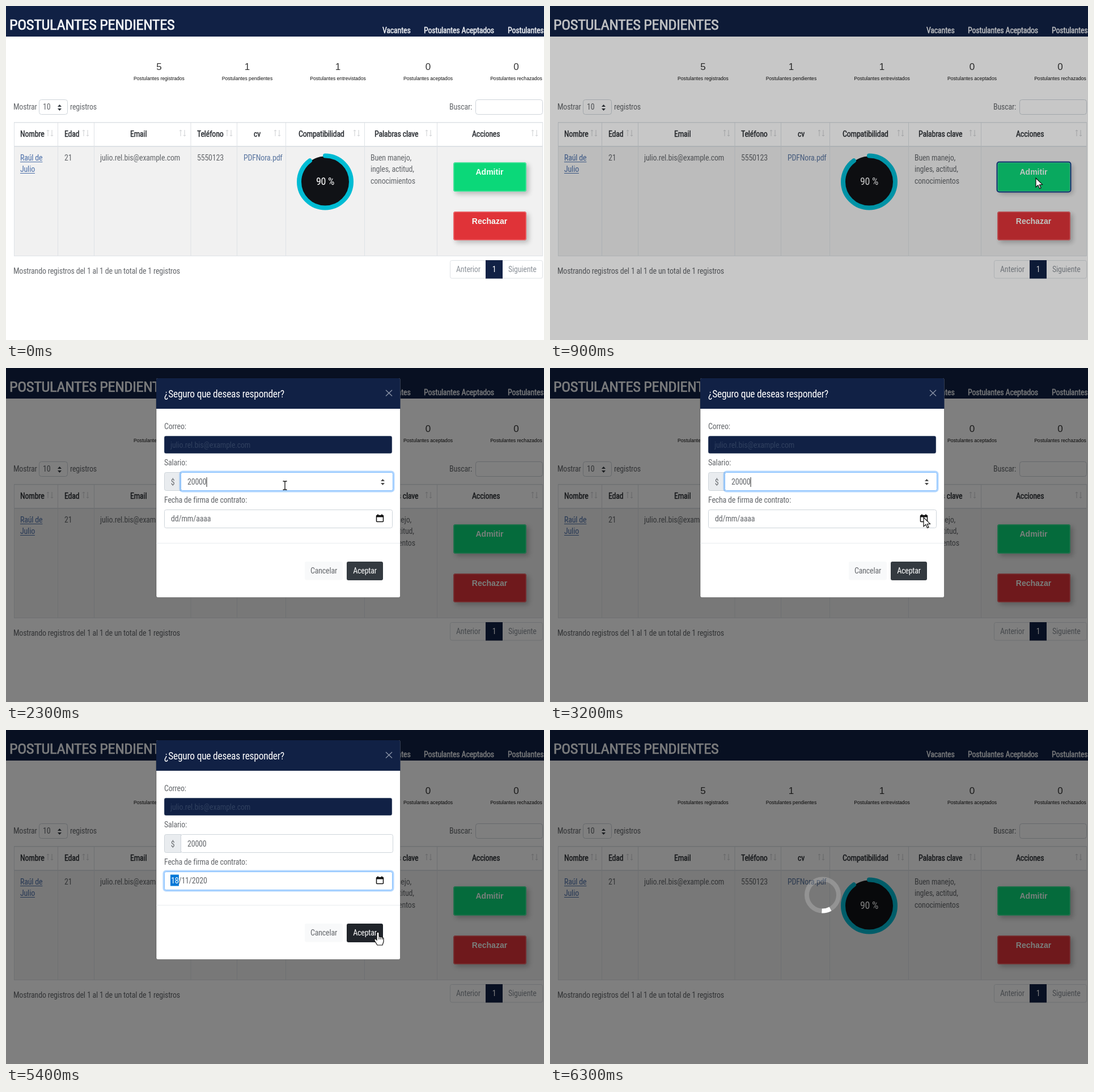
Recreate the animation shown at these times as an HTML page with a canvas. Size 949 by 590 pixels, loop 6400 ms.

```html
<!DOCTYPE html>
<html lang="es">
<head>
<meta charset="utf-8">
<title>Postulantes pendientes</title>
<style>
  html, body { margin: 0; width: 100%; height: 100%; overflow: hidden; background: #fff; }
  canvas { display: block; }
</style>
</head>
<body>
<canvas id="stage" width="949" height="590"></canvas>
<script>
const ctx = document.getElementById('stage').getContext('2d');
const LOOP = 6400, STEP = 100;
const NAVY = '#112145', LINE = '#dee2e6', EDGE = '#ced4da', BODY = '#65686c', INK = '#2a2e33';
const FACE = '"Roboto Condensed", Roboto, sans-serif';
const ARIAL = '"Liberation Sans", Arial, sans-serif';
const EMAIL = 'julio.rel.bis@example.com';
const TOTAL = 'Mostrando registros del 1 al 1 de un total de 1 registros';

// One tracking and size factor for the narrow face, whichever font is present
ctx.font = '100px ' + FACE;
const natural = ctx.measureText(TOTAL).width / 100;
const track = Math.min(0.02, Math.max(-0.045, (21 - natural) / TOTAL.length));
const shrink = Math.min(1, 21 / (natural + TOTAL.length * track));

const ramp = (t, a, b) => Math.min(1, Math.max(0, (t - a) / (b - a)));
const easeOut = p => 1 - Math.pow(1 - p, 1.8);
const smooth = p => p * p * (3 - 2 * p);
const inside = (p, x, y, w, h) => p.x >= x && p.x < x + w && p.y >= y && p.y < y + h;

function text(str, x, y, color = BODY, size = 14, align = 'left', bold = false) {
  size *= shrink;
  ctx.font = size + 'px ' + FACE;
  ctx.letterSpacing = size * track + 'px';
  ctx.textAlign = align;
  ctx.fillStyle = color;
  ctx.fillText(str, x, y);
  if (bold) {
    ctx.strokeStyle = color;
    ctx.lineWidth = size / 36;
    ctx.strokeText(str, x, y);
  }
}

function arial(str, x, y, size, color, align = 'center', bold = false) {
  ctx.font = (bold ? 'bold ' : '') + size + 'px ' + ARIAL;
  ctx.letterSpacing = '0px';
  ctx.textAlign = align;
  ctx.fillStyle = color;
  ctx.fillText(str, x, y);
}

function rect(x, y, w, h, color) {
  ctx.fillStyle = color;
  ctx.fillRect(x, y, w, h);
}

function box(x, y, w, h, r, fill, stroke, width = 1) {
  ctx.beginPath();
  ctx.roundRect(x, y, w, h, r);
  if (fill) { ctx.fillStyle = fill; ctx.fill(); }
  if (stroke) { ctx.strokeStyle = stroke; ctx.lineWidth = width; ctx.stroke(); }
}

function path(points, color, width, fill) {
  ctx.beginPath();
  points.forEach(([x, y], i) => i ? ctx.lineTo(x, y) : ctx.moveTo(x, y));
  if (fill) { ctx.closePath(); ctx.fillStyle = fill; ctx.fill(); }
  if (width) { ctx.strokeStyle = color; ctx.lineWidth = width; ctx.stroke(); }
}

function arc(x, y, r, from, to, color, width, cap = 'butt') {
  ctx.beginPath();
  ctx.arc(x, y, r, from, to);
  ctx.strokeStyle = color;
  ctx.lineWidth = width;
  ctx.lineCap = cap;
  ctx.stroke();
  ctx.lineCap = 'butt';
}

function arrow(x, y, h, dir, head, color, width) {
  const tip = y + dir * h / 2;
  path([[x, y - dir * h / 2], [x, tip]], color, width);
  path([[x - head, tip - dir * head], [x, tip], [x + head, tip - dir * head]], color, width);
}

function stepper(x, y, color) {
  path([[x - 3.5, y - 1.5], [x, y - 5.5], [x + 3.5, y - 1.5]], null, 0, color);
  path([[x - 3.5, y + 1.5], [x, y + 5.5], [x + 3.5, y + 1.5]], null, 0, color);
}

function shadow(color, blur, dx, dy) {
  ctx.shadowColor = color;
  ctx.shadowBlur = blur;
  ctx.shadowOffsetX = dx;
  ctx.shadowOffsetY = dy;
}
const noShadow = () => shadow('transparent', 0, 0, 0);

function action(label, y, h, color, light, focused) {
  shadow('rgba(0,0,0,.24)', 8, 4, 4);
  box(789, y, 129, h, 4, color);
  noShadow();
  box(789.8, y + .8, 127.4, h - 1.6, 3.5, null, light, 1.5);
  if (focused) box(788.5, y - .5, 130, h + 1, 4, null, '#17408f', 2);
  arial(label, 853, y + 22, 14, '#f4fff9', 'center', true);
}

function header() {
  rect(0, 0, 949, 54, NAVY);
  text('POSTULANTES PENDIENTES', 6, 41.5, '#f5f7fa', 26.5, 'left', true);
  [['Vacantes', 664], ['Postulantes Aceptados', 737], ['Postulantes', 885]]
    .forEach(([s, x]) => text(s, x, 47.5, '#f5f7fa', 14, 'left', true));
}

function stats() {
  [['5', 'registrados', 270], ['1', 'pendientes', 425.5], ['1', 'entrevistados', 585.5],
   ['0', 'aceptados', 744.5], ['0', 'rechazados', 900]].forEach(([n, s, x]) => {
    arial(n, x, 113, 17, '#333');
    arial('Postulantes ' + s, x, 130.5, 8.6, '#111');
  });
}

function table(focused) {
  text('Mostrar', 13, 183);
  box(58.5, 165.5, 50, 26, 4, '#fff', EDGE);
  text('10', 65, 183);
  stepper(94.5, 179.5, '#343a40');
  text('registros', 113, 183);
  text('Buscar:', 782, 183);
  box(828.5, 165.5, 118, 26, 4, '#fff', EDGE);

  rect(14, 248, 933, 193, '#f1f1f1');
  [14, 91, 155, 325.5, 407, 493, 632, 760, 946].forEach(x => rect(x, 205, 1, 236, LINE));
  rect(14, 205, 933, 1.5, LINE);
  rect(14, 247, 933, 2, LINE);
  rect(14, 441, 933, 1, LINE);

  [['Nombre', 25, 77], ['Edad', 103, 140], ['Email', 219, 311], ['Teléfono', 337, 393],
   ['cv', 437, 478], ['Compatibilidad', 516, 618], ['Palabras clave', 650, 745],
   ['Acciones', 822, 932]].forEach(([s, x, icon]) => {
    text(s, x, 231, INK, 14, 'left', true);
    arrow(icon - 3, 224.5, 11, -1, 2, '#ccced1', 1);
    arrow(icon + 4, 224.5, 11, 1, 2, '#ccced1', 1);
  });

  [['Raúl de', 273], ['Julio', 293]].forEach(([s, y]) => {
    text(s, 25, y, '#4a6ea8');
    rect(25, y + 2, ctx.measureText(s).width, 1, '#4a6ea8');
  });
  text('21', 103, 273);
  text(EMAIL, 166, 273);
  text('5550123', 337, 273);
  text('PDFNora.pdf', 419, 273, '#58749f');

  ctx.beginPath();
  ctx.arc(563, 310.5, 45, 0, 7);
  ctx.fillStyle = '#101216';
  ctx.fill();
  arc(563, 310.5, 46, -Math.PI / 2, Math.PI * 1.3, '#00bcd4', 8, 'round');
  text('90 %', 563, 315.5, '#fff', 18, 'center');

  ['Buen manejo,', 'ingles, actitud,', 'conocimientos']
    .forEach((s, i) => text(s, 643, 273 + 20.3 * i));
  action('Admitir', 276, 52, '#0bd879', '#4fe6a0', focused);
  action('Rechazar', 363, 51, '#e03338', '#ee6b6f');

  text(TOTAL, 13, 473);
  box(783.5, 449.5, 163, 31.5, 3, '#fff', LINE);
  rect(846, 449, 30, 32.5, NAVY);
  text('Anterior', 794, 470, '#8e949b');
  text('1', 861, 470, '#fff', 14, 'center');
  text('Siguiente', 886, 470, '#8e949b');
}

function field(x, y, w, h, focused) {
  if (focused) box(x - 1, y - 1, w + 2, h + 2, 4, null, 'rgba(0,123,255,.3)', 4);
  box(x, y, w, h, 3, '#fff', focused ? '#80bdff' : EDGE);
}

function modal(t, mouse) {
  const onSalary = t >= 1700 && t < 3400, onDate = t >= 3400;
  box(265, 18, 430.5, 387.5, 3, '#fff', 'rgba(0,0,0,.35)');
  box(265, 18, 430.5, 54, [3, 3, 0, 0], NAVY);
  text('¿Seguro que deseas responder?', 279, 52, '#fff', 17.5);
  path([[670, 39], [681, 49.5]], '#8f98aa', 1.2);
  path([[681, 39], [670, 49.5]], '#8f98aa', 1.2);

  text('Correo:', 279, 108);
  box(279, 120, 402, 31, 3, NAVY, EDGE, .5);
  text(EMAIL, 290, 140.5, '#30405f');

  text('Salario:', 279, 172);
  box(279.5, 184.5, 29, 32, [3, 0, 0, 3], '#e9ecef', EDGE);
  text('$', 294, 206, BODY, 14, 'center');
  field(308.5, 184.5, 374, 32, onSalary);
  const typed = '20000'.slice(0, t >= 2300 ? 5 : Math.min(4, Math.max(0, (t - 1700) / STEP)));
  text(typed, 320, 206);
  if (onSalary) {
    const end = 320 + ctx.measureText(typed).width;
    if (t < 2300 || Math.floor((t - 2300) / 200) % 2 === 0) rect(end, 193, 1, 17, '#222');
    stepper(664.5, 201.5, '#4a4a4a');
  }

  text('Fecha de firma de contrato:', 279, 238);
  field(279.5, 250.5, 402, 32, onDate);
  const [day, rest] = t < 4400 ? ['dd', '/mm/aaaa'] : ['18', '/11/2020'];
  text(day, 291, 270.5);
  const w = ctx.measureText(day).width;
  if (onDate) {
    rect(290, 255.5, w + 1.5, 20, '#0078d7');
    text(day, 291, 270.5, '#fff');
  }
  text(rest, 291 + w, 270.5);
  box(653.5, 260.5, 12, 11, 1, null, '#111', 1.5);
  rect(653, 260, 13, 3.5, '#111');
  rect(655, 258.5, 2, 2, '#111');
  rect(662, 258.5, 2, 2, '#111');

  rect(265, 309, 430, 1, '#e9ecef');
  box(527, 342, 67, 32.5, 3, '#f8f9fa');
  text('Cancelar', 560.5, 363, BODY, 14, 'center');
  box(601, 342, 64, 33, 3, inside(mouse, 601, 342, 64, 33) ? '#20242a' : '#343a40');
  text('Aceptar', 633, 363, '#fff', 14, 'center');
}

function calendar(mouse) {
  const cw = 24.25, ch = 24.3, left = 288, top = 347.3;
  shadow('rgba(0,0,0,.35)', 4, 1, 2);
  rect(279, 283, 188, 242, '#fff');
  noShadow();
  box(279.5, 283.5, 187, 241, 0, null, '#9a9a9a');
  arial('noviembre de 2020', 292, 302, 10.4, '#111', 'left', true);
  path([[336, 308], [342.5, 308], [339.2, 311.5]], null, 0, '#111');
  arrow(418, 303.5, 14, -1, 6, '#333', 1.3);
  arrow(445.5, 303.5, 14, 1, 6, '#333', 1.3);
  ['do.', 'lu.', 'ma.', 'mi.', 'ju.', 'vi.', 'sá.']
    .forEach((s, i) => arial(s, 300 + cw * i, 337.5, 10.4, '#222'));
  for (let i = 0; i < 42; i++) {
    const x = left + cw * (i % 7), y = top + ch * Math.floor(i / 7), today = i === 21;
    if (today) box(x + .5, y + .5, 23, 23, 0, '#0a70f0', '#111');
    else if (inside(mouse, x, y, cw, ch)) rect(x, y, cw, ch, '#b2d5f8');
    arial(i % 30 + 1, x + 12, y + 15.8, 10.4, today ? '#fff' : i < 30 ? '#222' : '#858585', 'center', today);
  }
  arial('Hoy', 439, 511, 10.8, '#1a73d8');
}

const ROUTE = [
  [400, 905, 440], [800, 857, 304], [1000, 857, 304], [1600, 492, 207], [2600, 492, 207],
  [3200, 659, 264], [3500, 659, 264], [3900, 389, 399], [4100, 372, 403], [4400, 372, 403],
  [5200, 656, 358], [5600, 656, 358]
];

function pointer(t) {
  const i = ROUTE.findIndex(k => k[0] > t);
  if (i < 1) return { x: -99, y: -99 };
  const [a, b] = [ROUTE[i - 1], ROUTE[i]], p = smooth(ramp(t, a[0], b[0]));
  return { x: a[1] + (b[1] - a[1]) * p, y: a[2] + (b[2] - a[2]) * p };
}

function cursor(t, mouse) {
  const open = t >= 1100;
  ctx.save();
  ctx.translate(mouse.x, mouse.y);
  if (open && inside(mouse, 309, 185, 374, 32)) {
    path([[-3.5, -7], [-1, -7], [0, -6], [0, 7], [-1, 8], [-3.5, 8]], '#111', 1.3);
    path([[3.5, -7], [1, -7], [0, -6]], '#111', 1.3);
    path([[3.5, 8], [1, 8], [0, 7]], '#111', 1.3);
  } else if (open && inside(mouse, 601, 342, 64, 33)) {
    path([[-2, 0], [0, -1], [2, 0], [2, 7], [8, 8], [10, 10], [10, 16], [8, 22], [-1, 22],
          [-6, 14], [-6, 11], [-4, 11], [-2, 13], [-2, 0]], '#111', 1.2, '#fff');
    [2, 5, 8].forEach(x => path([[x, 8], [x, 12]], '#111', 1));
  } else {
    path([[0, 0], [0, 16], [3.8, 12.6], [6.6, 18.5], [9, 17.4], [6.4, 11.7], [11.5, 11.4], [0, 0]],
      '#111', 1.2, '#fff');
  }
  ctx.restore();
}

function spinner(t) {
  const p = ramp(t, 5655, 5805), y = 291.5 - 50 * (1 - easeOut(p));
  ctx.globalAlpha = ramp(t, 5655, 5730);
  arc(481, y, 28, 0, Math.PI * 2, 'rgba(255,255,255,.2)', 8);
  const mid = (5.5 + 0.7192 * (t - 5700)) * Math.PI / 180;
  arc(481, y, 28, mid - .28, mid + .28, '#fff', 8);
  ctx.globalAlpha = 1;
}

const dim = a => a > 0 && rect(0, 0, 949, 590, `rgba(0,0,0,${a})`);

function draw(t) {
  const mouse = pointer(t);
  rect(0, 0, 949, 590, '#fff');
  header();
  stats();
  table(t >= 800 && t < 1100);
  dim(.5 * ramp(t, 867, 942) * (1 - ramp(t, 5657, 5732)));

  const alpha = ramp(t, 942, 1017) * (1 - ramp(t, 5510, 5585));
  if (alpha > 0) {
    const shift = 1 - easeOut(ramp(t, 942, 1092)) + easeOut(ramp(t, 5510, 5660));
    ctx.save();
    ctx.globalAlpha = alpha;
    ctx.translate(0, -50 * shift);
    modal(t, mouse);
    ctx.restore();
  }
  if (t >= 3400 && t < 4400) calendar(mouse);
  dim(.5 * ramp(t, 5580, 5655));
  if (t > 5655) spinner(t);
  cursor(t, mouse);
}

// The screen refreshes in fixed steps
const start = performance.now();
function tick() {
  const t = (performance.now() - start) % LOOP;
  draw(Math.floor(t / STEP) * STEP);
  requestAnimationFrame(tick);
}
tick();
</script>
</body>
</html>
```
